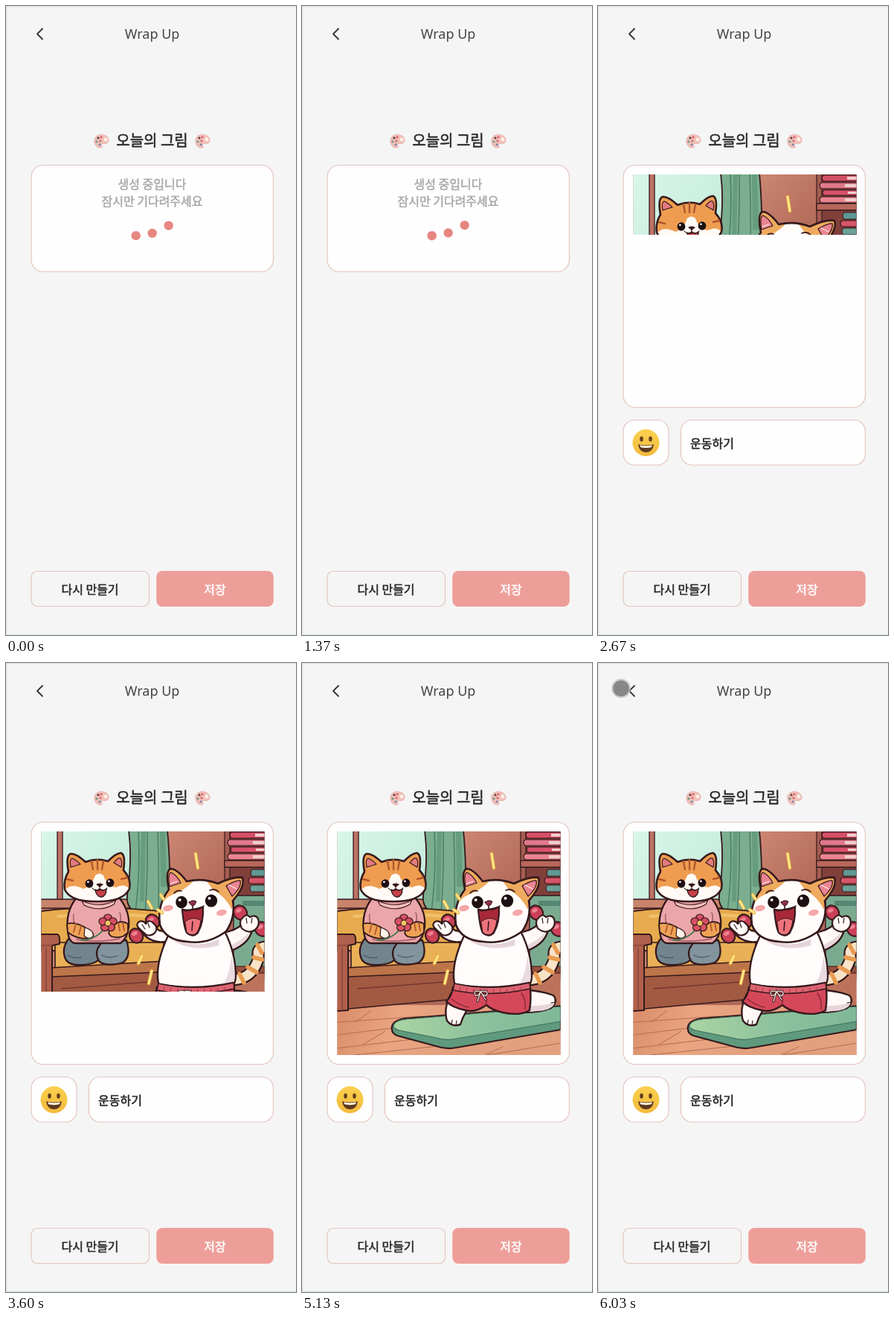
Animation, 390 px wide and 844 px high, one loop 6.11 s. Source, as an HTML page with a canvas:

```html
<!DOCTYPE html>
<html lang="ko">
<head>
<meta charset="utf-8">
<title>Wrap Up</title>
<style>
html, body { margin: 0; width: 100%; height: 100%; overflow: hidden; background: #f5f5f5; }
canvas { display: block; width: 390px; height: 844px; }
</style>
</head>
<body>
<canvas id="stage"></canvas>
<script>
const W = 390, H = 844, LOOP = 6110;
const READY = 1400;                                   // result layout replaces the loader
const LOADS = [[2670, 307], [3530, 441], [4170, 526]]; // picture arrives in chunks: time, bottom edge
const PRESS = 5830;
const BOUNCE = 687, LAG = 0.1167;
const INK = '#35191c', BORDER = '#e4c5bd';
const KR = '"Noto Sans CJK KR", "Noto Sans KR", "Noto Sans CJK JP", "Noto Sans CJK", "Noto Sans", sans-serif';

const canvas = document.getElementById('stage');
const dpr = window.devicePixelRatio || 1;
canvas.width = W * dpr;
canvas.height = H * dpr;
const c = canvas.getContext('2d');

const clamp = x => Math.max(0, Math.min(1, x));
const ease = x => { x = clamp(x); return x * x * (3 - 2 * x); };

function rect(x, y, w, h, fill) {
  c.fillStyle = fill;
  c.fillRect(x, y, w, h);
}

function blend(x1, y1, x2, y2, ...colors) {
  const g = c.createLinearGradient(x1, y1, x2, y2);
  colors.forEach((color, i) => g.addColorStop(i / (colors.length - 1), color));
  return g;
}

function box(x, y, w, h, r, fill, line) {
  c.beginPath();
  c.roundRect(x, y, w, h, r);
  if (fill) { c.fillStyle = fill; c.fill(); }
  if (line) { c.strokeStyle = line; c.lineWidth = 1.2; c.stroke(); }
}

function path(d, fill, width = 2, line = INK) {
  const p = new Path2D(d);
  if (fill) { c.fillStyle = fill; c.fill(p); }
  if (width) { c.strokeStyle = line; c.lineWidth = width; c.stroke(p); }
}

const stroke = (d, width, line) => path(d, null, width, line);

function oval(x, y, rx, ry, fill, width = 0, turn = 0, line = INK) {
  c.beginPath();
  c.ellipse(x, y, rx, ry, turn, 0, 7);
  c.fillStyle = fill;
  c.fill();
  if (width) { c.strokeStyle = line; c.lineWidth = width; c.stroke(); }
}

function text(s, x, y, font, fill, align = 'center') {
  c.font = font;
  c.fillStyle = fill;
  c.textAlign = align;
  c.fillText(s, x, y);
}

// Korean labels in a medium weight: regular glyphs with a hairline outline
function label(s, x, y, size, fill, align) {
  text(s, x, y, `400 ${size}px ${KR}`, fill, align);
  c.strokeStyle = fill;
  c.lineWidth = .55;
  c.strokeText(s, x, y);
}

function eye(x, y, r) {
  oval(x, y, r, r * 1.05, '#1d0f12');
  oval(x - r * .3, y - r * .4, r * .25, r * .25, '#fff');
}

function room() {
  rect(47, 226, 301, 300, blend(218, 226, 300, 300, '#cb8673', '#b06857'));
  rect(47, 226, 130, 95, blend(47, 226, 170, 320, '#d8f6e9', '#c3ebdb'));
  path('M69 225L76 225L76 318L69 318Z', '#bd7364', 1.3);
  path('M46 317L190 317L190 329L46 329Z', '#c88368', 1.3);
  path('M165 225L217 225Q221 262 221 345L180 338Q161 330 163 312Q170 262 165 225Z', '#7bae8e', 1.8);
  stroke('M178 226Q181 280 174 334M190 226Q191 280 187 336M204 226Q206 280 205 335', 1.5, '#4c7d68');
  path('M182 226L188 226L186 320L180 320ZM207 226L214 226L216 300L208 300Z', '#669c80', 0);

  rect(295, 226, 53, 100, '#81403a');
  path('M294 225L301 225L301 322L294 322Z', '#a45d50', 1.2);
  for (const [x, y, h, fill] of [
    [303, 227, 8, '#d64f66'], [300, 237, 8, '#e0798a'], [304, 247, 7, '#d9526a'], [300, 256, 8, '#e8848f'],
    [331, 277, 9, '#5f9895'], [328, 288, 8, '#d8566a'], [330, 298, 9, '#6ba096']]) {
    path(`M${x} ${y}L348 ${y}L348 ${y + h}L${x} ${y + h}Q${x - 4} ${y + h / 2} ${x} ${y}Z`, fill, 1.1);
    if (y < 270) rect(x + 32, y + 2, 18, h - 4, '#f0cfcb');
  }
  path('M294 265L348 265L348 274L294 274Z', '#b8685a', 1.3);
  path('M306 312L348 312L348 424L306 424Z', '#7aab90', 1.3);
  path('M318 319L348 319L348 326L318 326Z', '#568773', 0);
  rect(300, 410, 48, 60, '#bd735b');
  path('M300 407L348 407L348 416L300 416Z', '#95503f', 1);

  // floor
  rect(47, 459, 301, 67, blend(47, 459, 200, 526, '#d98c69', '#eaa581', '#e3a07e'));
  stroke('M47 482L160 474M47 499L128 489M47 517L190 500M70 526L250 507M250 526L348 510', 1.1, '#b66c51');
  stroke('M92 467L72 482M112 494L82 512M270 515L246 526', 1, '#b66c51');

  // bench
  path('M47 333Q130 323 222 335L222 386L47 386Z', '#e6ab4e', 1.8);
  stroke('M70 340Q130 334 205 341', 4, '#f0c067');
  path('M66 375L212 375L212 402L66 411Z', '#eab056', 1.6);
  path('M60 409L212 400L212 416L60 422Z', '#bd7549', 1.6);
  path('M62 421L206 415L206 451L62 464Z', '#a25a42', 1.6);
  stroke('M75 437L192 428', 1.3, '#75382f');
  path('M46 364L69 364Q73 365 72 377L62 379L62 466L46 467Z', '#b0604c', 2);
  stroke('M47 379L62 379M54 383L54 464', 1.2, '#7b3b35');

  // mat
  path('M121 492Q119 480 138 477L348 460L348 492L208 516Q194 519 180 514L128 500Q121 497 121 492Z', '#5f9a7f', 2.2);
  path('M123 487Q124 480 140 478L348 461L348 481L208 504Q193 507 181 503L131 493Q123 491 123 487Z',
    blend(130, 480, 348, 490, '#a9d3a3', '#8cc29c', '#7fb897'), 1.2, '#3f6d59');
}

function sittingCat() {
  // legs
  path('M85 369Q73 384 81 399Q89 409 116 403Q127 400 130 389L162 367Z', '#72858f', 2.3);
  path('M131 373Q116 387 126 401Q137 408 157 402Q169 394 162 372Z', '#82949d', 2.3);
  stroke('M83 392Q91 397 101 395M129 392Q138 397 150 393', 1.3, '#455963');
  // sweater
  path('M94 316Q80 334 83 359Q84 374 92 376L154 376Q163 370 165 354Q167 334 153 316Z', '#eba6a9', 2.3);
  path('M102 319Q126 330 148 318L145 324Q126 335 105 325Z', '#f3bcbb', 1.2);
  stroke('M91 337Q89 349 97 356M153 335Q157 345 149 354M95 371Q122 376 153 370', 1.4, '#9e5760');
  path('M82 350Q92 347 105 354L117 363Q119 370 110 370Q93 370 83 361Z', '#efa255', 1.8);
  path('M164 350Q153 343 143 354Q134 362 142 367Q157 371 164 361Z', '#efa255', 1.8);
  stroke('M94 350L91 361M101 353L98 364M157 349L159 359M151 349L153 359', 2, '#b65e34');
  path('M106 355Q119 359 117 367Q111 372 105 366Z', '#fff2e9', 1.2);
  // flower
  stroke('M137 350Q123 372 101 372', 2, '#4f7b50');
  for (let i = 0; i < 5; i++) {
    const a = i * Math.PI * .4 - 1.57;
    oval(137 + 7 * Math.cos(a), 349 + 7 * Math.sin(a), 5.3, 5, '#d95063', 1.2);
  }
  oval(137, 349, 4, 4, '#f7ca65', 1);
  // head
  const head = 'M84 280Q80 258 87 256Q94 255 107 267Q122 261 137 266Q149 254 155 255Q161 258 158 278Q169 290 166 303Q158 320 124 320Q87 321 79 304Q77 291 84 280Z';
  path(head, '#ee9d50', 0);
  path('M80 304Q88 295 104 303Q115 300 120 285Q126 280 131 285Q136 300 148 301Q159 295 166 303Q158 319 124 319Q88 320 80 304Z', '#fffaf5', 0);
  stroke(head, 2.6);
  path('M87 274Q85 263 89 262Q94 264 100 270ZM145 268Q151 260 154 262Q157 266 155 274Z', '#e37b80', 1.2);
  stroke('M115 266L117 277M123 264L123 277M131 266L129 277M82 290L90 292M163 288L155 290', 2.4, '#b0562d');
  eye(112, 296, 5.4);
  eye(140, 295, 5.4);
  path('M121 297Q126 294 131 297L126 301Z', '#39191d', 0);
  path('M120 304Q125 307 126 303Q129 307 135 303Q135 313 128 314Q121 313 120 304Z', '#c63f49', 1.4);
  stroke('M126 300L126 304M116 302Q120 307 126 303Q132 307 136 302', 1.2);
}

function dumbbell(x1, y1, x2, y2) {
  stroke(`M${x1} ${y1}L${x2} ${y2}`, 7, INK);
  stroke(`M${x1} ${y1}L${x2} ${y2}`, 4, '#cf4458');
  for (const [x, y] of [[x1, y1], [x2, y2]]) {
    oval(x, y, 10, 8.8, '#cc4057', 2.2, 1);
    oval(x - 2, y - 3, 4, 2.5, '#ed8491', 0, -.5);
  }
}

function trainingCat() {
  // tail
  const tail = 'M303 425Q324 425 334 409Q341 397 339 391Q338 382 349 381';
  stroke(tail, 17, INK);
  stroke(tail, 12.5, '#f9e3c8');
  stroke('M314 417L320 429M325 408L337 415M333 395L345 398M338 378L344 389', 5.5, '#e99b51');
  // legs
  path('M287 438Q321 439 338 446Q345 454 335 463Q319 470 288 469Z', '#fff9f7', 2.4);
  path('M287 458Q318 463 340 455Q338 465 319 467L288 469Z', '#e7d6dc', 0);
  path('M200 444Q190 464 195 480Q202 489 213 485Q218 468 232 453Z', '#fff9f7', 2.4);
  stroke('M201 485L202 479M207 486L208 480M335 456L341 455', 1.2);
  // arms behind the body
  path('M226 370Q204 380 188 367Q180 359 187 350Q197 350 206 359Q218 361 235 355Z', '#fff9f7', 2.4);
  path('M291 362Q310 359 318 350L331 357Q328 379 294 389Z', '#fff9f7', 2.4);
  path('M297 381Q317 373 327 361Q326 377 294 388Z', '#e7d6dc', 0);
  // body
  path('M221 360Q203 395 204 421Q204 436 214 444L294 444Q308 437 309 421Q309 389 294 360Z', '#fffcfb', 2.4);
  path('M303 392Q312 430 302 440L285 441Q301 424 303 392Z', '#eadbe0', 0);
  path('M226 368Q253 385 287 371L286 379Q252 388 227 374Z', '#e6d3dc', 0);
  // shorts
  path('M207 431Q254 440 306 429Q309 449 306 466Q294 474 270 469Q256 466 248 459Q232 470 220 466Q201 462 194 454Q201 448 203 435Z', '#d5485a', 2.4);
  path('M205 430Q254 441 306 429L307 437Q254 449 203 439Z', '#dd6470', 1.6);
  stroke('M247 446Q249 453 247 459M201 451Q213 460 224 462M295 443Q302 453 300 464', 1.4, '#8b2738');
  for (let i = 0; i < 10; i++) stroke(`M${213 + i * 9} ${435 + Math.sin(i / 3) * 3}l-1 5`, 1, '#a63548');
  const bow = 'M240 441Q230 438 233 446Q237 448 240 441Q250 438 249 445Q245 449 240 441L236 454M241 442L247 452';
  stroke(bow, 3, INK);
  stroke(bow, 1.2, '#fff0eb');
  // ears and head
  const head = 'M219 304Q214 280 221 276Q230 276 243 293Q265 288 285 296Q306 286 318 288Q322 300 305 319Q309 341 296 360Q272 378 244 374Q214 372 207 351Q203 325 219 304Z';
  path(head, '#fffcfa', 0);
  path('M219 304Q214 280 221 276Q230 276 243 293L253 292Q243 302 231 308Q219 312 212 319Q213 311 219 304Z', '#eeaa5e', 0);
  path('M269 292L285 296Q306 286 318 288Q322 300 305 319Q306 326 304 331Q294 312 279 305Z', '#eeaa5e', 0);
  stroke(head, 2.6);
  path('M220 300Q217 283 222 281Q230 285 235 295ZM296 299Q310 291 315 292Q317 301 304 313Z', '#ea8492', 1.3);
  stroke('M221 296L230 293M300 298L310 303', 1.3, '#fff0eb');
  oval(218, 329, 7, 4, '#f5a6a7', 0, -.2);
  oval(290, 335, 7, 4, '#f5a6a7', 0, -.2);
  eye(236, 321, 7.8);
  eye(276, 319, 8.2);
  stroke('M226 309Q230 304 236 306M274 305Q281 302 286 307', 1.6);
  path('M246 321Q251 317 256 320Q254 326 251 326Q248 325 246 321Z', '#8f3445', 1);
  path('M237 331Q249 333 265 327Q266 348 258 362Q251 369 243 362Q239 354 237 331Z', '#a9283a', 2.2);
  path('M241 347Q250 339 262 345Q260 360 254 364Q247 366 243 361Z', '#ef737d', 1);
  stroke('M251 326L251 331M237 330Q244 335 251 330Q258 333 266 326M251 347L250 359', 1.6);
  // dumbbells and paws
  dumbbell(175, 366, 197, 347);
  path('M181 358Q173 352 179 347Q185 345 188 350Q192 343 198 349Q205 354 201 361Q196 367 189 365Z', '#fffaf7', 2.2);
  stroke('M183 351L187 357M191 349L193 355', 1.2);
  dumbbell(315, 335, 344, 357);
  path('M317 356Q312 347 319 341Q324 336 328 341Q335 337 339 343Q342 352 335 358Q327 364 317 356Z', '#fffaf7', 2.2);
  stroke('M323 342L324 349M331 342L330 349', 1.2);
}

function picture() {
  room();
  sittingCat();
  trainingCat();
  const rays = 'M255 256L258 275M191 320L196 329M208 311L212 317M183 393L178 403M196 413L192 430M204 331L210 335';
  stroke(rays, 4.6, '#e9a640');
  stroke(rays, 2.8, '#ffe987');
}

function palette(x, y) {
  c.save();
  c.translate(x, y);
  path('M-9 1C-10 -6 -3 -10 3 -8C10 -7 12 0 8 3C5 5 3 2 1 4C-1 7 3 8 0 9C-5 10 -9 6 -9 1Z', '#f1c0b7', .7, '#e2a39b');
  oval(6, -2, 2.5, 2.5, '#fbf0ec');
  for (const [dx, dy, fill] of [[-4, -4, '#5d4048'], [0, -5, '#d9626f'], [-6, 1, '#6b9a8b'], [-2, 5, '#7a88ac'], [-1, 0, '#d4677f']])
    oval(dx, dy, 1.6, 1.6, fill);
  c.restore();
}

function smile(x, y) {
  oval(x, y, 18, 18, blend(x, y - 18, x, y + 18, '#fbd04f', '#f3ba3e'));
  oval(x - 6, y - 5, 2.3, 3.4, '#61401f');
  oval(x + 6, y - 5, 2.3, 3.4, '#61401f');
  path(`M${x - 10.5} ${y + 2}Q${x} ${y + 5} ${x + 10.5} ${y + 2}Q${x + 9} ${y + 13} ${x} ${y + 13}Q${x - 9} ${y + 13} ${x - 10.5} ${y + 2}Z`, '#5d381f', 0);
  path(`M${x - 8.5} ${y + 3.2}Q${x} ${y + 5.5} ${x + 8.5} ${y + 3.2}L${x + 7} ${y + 6.3}Q${x} ${y + 7.8} ${x - 7} ${y + 6.3}Z`, '#fff8e8', 0);
}

// up to the top, down through the middle, then back to rest
function bounce(p) {
  p = (p % 1 + 1) % 1 * 3;
  if (p < 1) return -ease(p);
  if (p < 2) return -1 + 2 * ease(p - 1);
  return 1 - ease(p - 2);
}

function loader(t) {
  box(34, 213.5, 325.5, 143, 16, '#fefefe', BORDER);
  label('생성 중입니다', 196.5, 245, 16, '#a9a9a9');
  label('잠시만 기다려주세요', 196.5, 267.5, 16, '#a9a9a9');
  for (let i = 0; i < 3; i++)
    oval(174.7 + 22 * i, 298 + 10.4 * bounce(t / BOUNCE + .695 - LAG * i), 6.2, 6.2, '#e78680');
}

function result(t) {
  box(34, 213.5, 325.5, 325, 16, '#fefefe', BORDER);
  box(34, 555.5, 61, 60.5, 15, '#fefefe', BORDER);
  box(111.5, 555.5, 248, 60.5, 15, '#fefefe', BORDER);
  smile(64.5, 586);
  label('운동하기', 124, 592.5, 16, '#252525', 'left');
  let bottom = 0;
  for (const [at, y] of LOADS) if (t >= at) bottom = y;
  if (!bottom) return;
  c.save();
  c.beginPath();
  c.rect(47.5, 226, 300, bottom - 226);
  c.clip();
  picture();
  c.restore();
}

function press(t) {
  const k = ease((t - PRESS) / 180), x = 29.5 + 1.5 * k, y = 27 + 7 * k;
  c.globalAlpha = .3 + .7 * clamp((t - PRESS) / 100);
  oval(x, y, 13, 13, 'rgba(195,195,195,.75)');
  oval(x, y, 10.8, 10.8, '#878787');
  c.globalAlpha = 1;
}

function draw(now) {
  const t = now % LOOP;
  c.setTransform(dpr, 0, 0, dpr, 0, 0);
  c.lineCap = c.lineJoin = 'round';
  rect(0, 0, W, H, '#f5f5f5');
  rect(0, 0, W, 1.5, '#dfe6e7');
  rect(0, 0, 1.5, H, '#e0e4e5');
  rect(0, H - 1.5, W, 1.5, '#dff2e1');

  stroke('M49 30.5L42 37.5L49 44.5', 1.8, '#333');
  text('Wrap Up', 196.5, 44, '400 18px "Noto Sans", sans-serif', '#454545');
  label('오늘의 그림', 196.5, 187.5, 20, '#292929');
  palette(128, 181);
  palette(264, 181);

  t < READY ? loader(t) : result(t);

  box(34, 758.5, 158.5, 47, 8, null, BORDER);
  box(202.3, 758, 157.5, 48, 8, '#ee9e99');
  label('다시 만들기', 113, 789, 16, '#292929');
  label('저장', 281, 789, 16, '#fff');
  if (t >= PRESS) press(t);
  requestAnimationFrame(draw);
}
requestAnimationFrame(draw);
</script>
</body>
</html>
```
